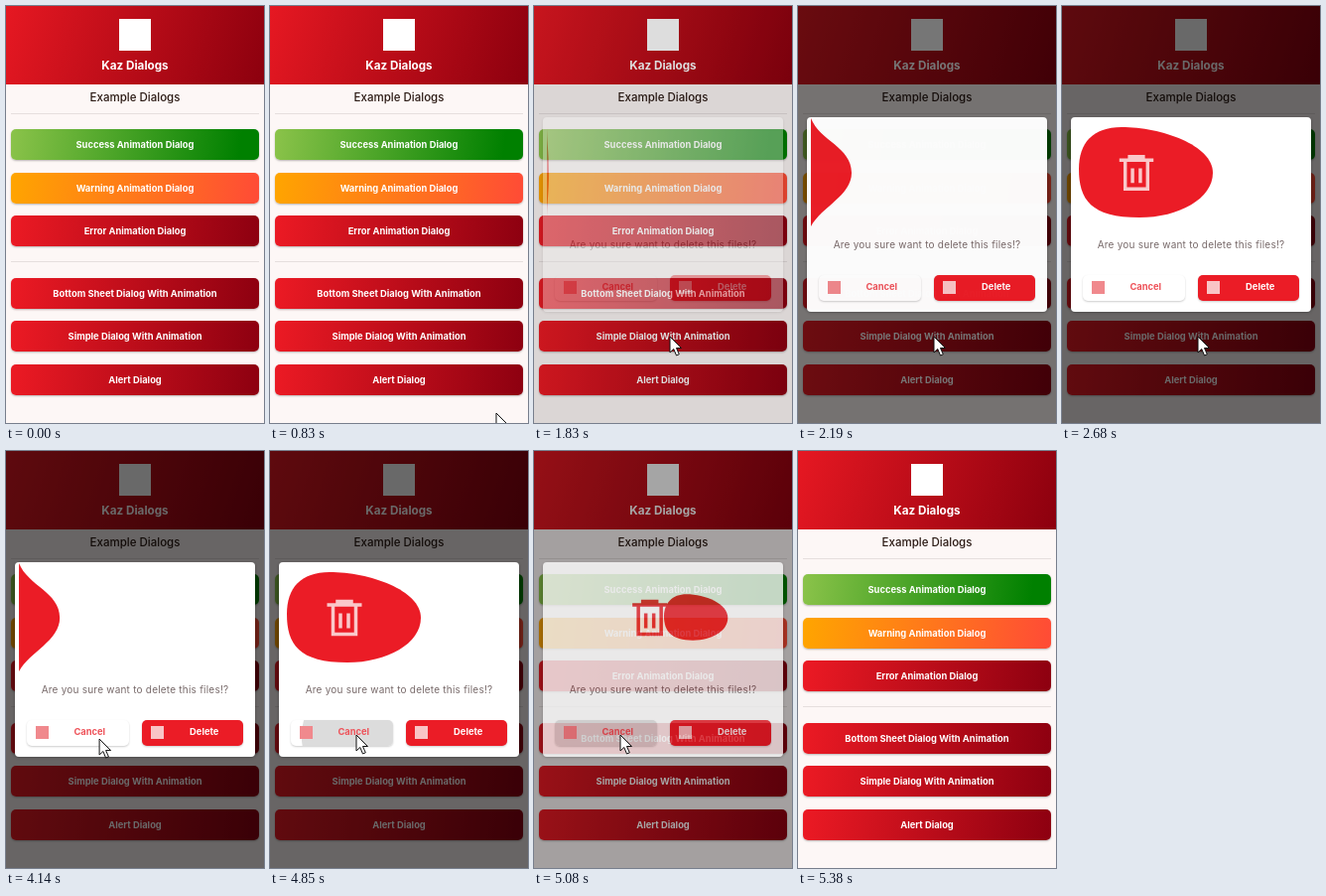
An HTML page that plays this animation: 260 by 420 pixels, repeating every 5610 ms.

```html
<!DOCTYPE html>
<html lang="en">
<head>
<meta charset="utf-8">
<title>Dialogs</title>
<style>
  html, body { margin: 0; width: 100%; height: 100%; overflow: hidden; }
  body { background: #fdf7f6; font: 700 9.35px Inter, sans-serif; }
  #stage { position: relative; width: 260px; height: 420px; overflow: hidden; }
  #stage div, svg { position: absolute; box-sizing: border-box; }
  header { position: absolute; width: 260px; height: 79px; color: #fff;
    background: linear-gradient(107deg, #e61822, #8c000e); }
  .logo { left: 114px; top: 13px; width: 32px; height: 32px; background: #fff; }
  .label { width: 100%; text-align: center; white-space: nowrap; }
  .line { left: 5px; width: 250px; height: 1px; background: #e6dfde; }
  .button { left: 5px; width: 250px; height: 31px; border-radius: 5px; color: #fff;
    line-height: 31px; text-align: center; white-space: nowrap;
    background: linear-gradient(97deg, #ec1a24, #8d0010); box-shadow: 0 1px 2px #0004; }
  .success { background: linear-gradient(97deg, #8bc34a, #008000 92%); }
  .warning { background: linear-gradient(97deg, #ffa500, #ff4b36); }
  #barrier { inset: 0; background: #000; }
  #dialog { inset: 0; }
  .card { left: 9px; top: 112px; width: 242px; height: 196px; border-radius: 4px;
    background: #fff; box-shadow: 0 1px 3px #0004; }
  .action { top: 271px; width: 102.5px; height: 25.5px; border-radius: 5px; overflow: hidden;
    line-height: 24px; box-shadow: 0 1px 2px #0003; }
  .action span { position: absolute; left: 24px; right: 0; text-align: center; }
  .action i { position: absolute; left: 9px; top: 6px; width: 13px; height: 13px; }
  #ripple { left: 66px; top: 15px; width: 2px; height: 2px; border-radius: 50%; background: #dcdcdc; }
  svg { left: 0; top: 0; }
</style>
</head>
<body>
<div id="stage">
  <header>
    <div class="logo"></div>
    <div class="label" style="top:53px;font-size:11.7px">Kaz Dialogs</div>
  </header>
  <div class="label" style="top:85px;font-size:11.5px;font-weight:500;color:#2b1a14">Example Dialogs</div>
  <div class="line" style="top:108px"></div>
  <div class="button success" style="top:124px">Success Animation Dialog</div>
  <div class="button warning" style="top:167.5px">Warning Animation Dialog</div>
  <div class="button" style="top:211px">Error Animation Dialog</div>
  <div class="line" style="top:257px"></div>
  <div class="button" style="top:273.5px">Bottom Sheet Dialog With Animation</div>
  <div class="button" style="top:317px">Simple Dialog With Animation</div>
  <div class="button" style="top:360.5px">Alert Dialog</div>

  <div id="barrier"></div>
  <div id="dialog">
    <div class="card"></div>
    <svg width="260" height="420">
      <path id="blob" fill="#eb1c26"/>
      <circle id="dot" cx="28.5" cy="127" fill="#eb1c26"/>
      <g id="bin" fill="none" stroke-width="3.5">
        <path d="M-17.5-13H17.5M-7-13V-16.500H7V-13M-11.500-12V16.500H11.500V-12M-4-4.500V10.500M4-4.500V10.500"/>
      </g>
    </svg>
    <div class="label" style="top:234px;font-size:10px;font-weight:400;letter-spacing:.22px;color:#786a6a">Are you sure want to delete this files!?</div>
    <div class="action" style="left:21px;background:#fff;color:#ee5158">
      <div id="ripple"></div><i style="background:#f0898d"></i><span>Cancel</span>
    </div>
    <div class="action" style="left:136.5px;background:#eb1c26;color:#fff">
      <i style="background:#f9c4c6"></i><span>Delete</span>
    </div>
  </div>
  <svg width="260" height="420">
    <path id="cursor" d="M0 0V16L3.800 12.500 6.500 19 9.300 17.800 6.500 11.500H11.500Z" fill="#fff" stroke="#111"/>
  </svg>
</div>
<script>
const LOOP = 5610, OPEN = 1710, CLOSE = 4880, BIN_START = 1750, BIN_LOOP = 1940;
const $ = id => document.getElementById(id);
const ramp = (t, a, b) => Math.min(1, Math.max(0, (t - a) / (b - a)));
const smooth = k => k * k * (3 - 2 * k);

// keys: [time, ...values]; eased between neighbours
function track(keys, t, ease = smooth) {
  let i = 1;
  while (i < keys.length - 1 && t > keys[i][0]) i++;
  const [a, b] = [keys[i - 1], keys[i]], k = ease(ramp(t, a[0], b[0]));
  return a.slice(1).map((v, n) => v + (b[n + 1] - v) * k);
}

const point = (x, y) => Array.from({ length: 24 }, (_, i) => i % 2 ? y : x);
// closed outline: left, top, right, bottom, each followed by two handles
const bulge = [13,168, 13,150, 13,130, 13,113, 22,136, 54,142, 54,168, 54,191, 24,202, 13,222, 13,205, 13,185];
const egg = [17,164, 17,138, 31,122, 60,122, 100,122, 152,140, 152,168, 152,194, 118,213, 78,213, 29,213, 17,195];
const drop = [196,168, 196,162, 201,157, 207,157, 214,157, 220,162, 220,168, 220,174, 214,178, 207,178, 201,178, 196,174];
const sliver = bulge.map((v, i) => i % 2 ? 168 + (v - 168) * .82 : 13 + (v - 13) * .05);

const blobKeys = [
  [0, ...point(13, 168)], [80, ...sliver], [440, ...bulge], [900, ...egg],
  [1160, ...egg], [1550, ...drop], [1720, ...point(221, 168)]
];
const binKeys = [[1160, 75], [1500, 130]];
const cursorKeys = [
  [830, 228, 410], [1370, 137, 333], [2680, 137, 333], [3220, 154.5, 331],
  [3600, 154.5, 331], [3830, 143, 318], [4230, 87, 286]
];

function draw(t) {
  const shown = ramp(t, OPEN, OPEN + 530) * (1 - ramp(t, CLOSE, 5380));
  $('barrier').style.opacity = shown * .59;
  $('dialog').style.opacity = 1 - (1 - shown) ** 1.6;

  const u = Math.max(0, t - BIN_START) % BIN_LOOP;
  const p = track(blobKeys, u);
  $('blob').setAttribute('d', `M${p.slice(0, 2)}C${p.slice(2)} ${p.slice(0, 2)}Z`);
  $('dot').setAttribute('r', 4.7 * ramp(u, 1400, 1530) * (1 - ramp(u, 1600, 1740)));

  const size = smooth(ramp(u, 700, 950) * (1 - ramp(u, 1600, 1780)));
  const pale = 1 - ramp(u, 1250, 1400);
  $('bin').setAttribute('transform', `translate(${track(binKeys, u)} 168) scale(${size})`);
  $('bin').setAttribute('stroke', `rgb(${235 + 15 * pale},${28 + 172 * pale},${38 + 164 * pale})`);

  $('ripple').style.transform = `scale(${Math.max(0, t - 4600) / 250 * 56})`;

  $('cursor').setAttribute('transform', `translate(${track(cursorKeys, t)})`);
  $('cursor').style.display = t >= 830 && t < 5380 ? '' : 'none';
}

const start = performance.now();
function frame() {
  draw((performance.now() - start) % LOOP);
  requestAnimationFrame(frame);
}
frame();
</script>
</body>
</html>
```
